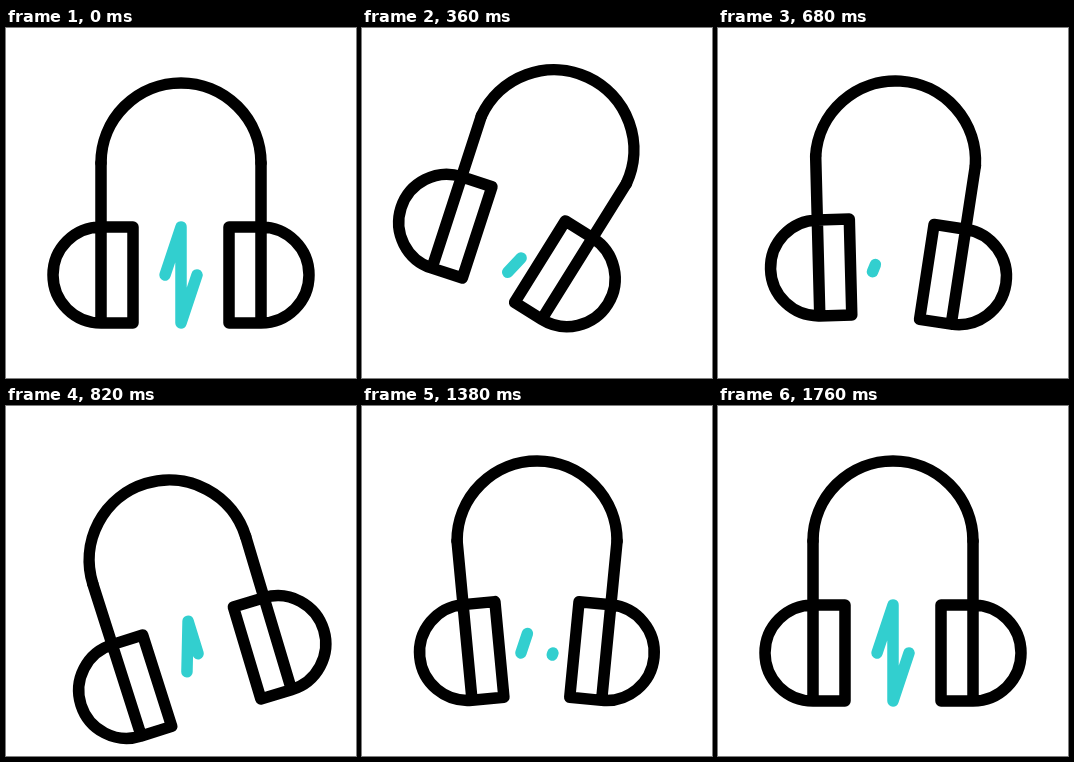
Write an HTML page with a canvas that moves like this. It is 350 by 350 pixels and loops after 2.4 s.

```html
<!DOCTYPE html>
<html lang="en">
<head>
<meta charset="utf-8">
<title>Headphones</title>
<style>
  html, body { margin: 0; width: 100%; height: 100%; overflow: hidden; background: #fff; }
  canvas { display: block; }
</style>
</head>
<body>
<canvas id="stage" width="350" height="350"></canvas>
<script>
const ctx = document.getElementById('stage').getContext('2d');
const LOOP = 2400, STEP = 20, RAD = Math.PI / 180;

// Keyframes: [time in ms, value], eased in and out between neighbours
const TILT = [[0, 0], [470, 29], [880, -20], [1200, 10], [1510, -6], [1760, 0]];
const LIFT = [[0, 0], [500, -21], [880, 20], [1250, 0]];
const SQUEEZE = [[0, 0], [520, 9], [870, 0], [1200, 9.5], [1600, 0]];

const bolt = new Path2D('M159 247 L175 199 V295 L191 247');
const boltLength = 96 + 2 * Math.hypot(16, 48);
const band = new Path2D('M95 135 A80 80 0 0 1 255 135');
const side = new Path2D('M95 135 V295 M127 199 H95 A48 48 0 0 0 95 295 H127 Z');

function ease(t, from, to) {
  const u = Math.min(1, Math.max(0, (t - from) / (to - from)));
  return u * u * (3 - 2 * u);
}

function track(keys, t) {
  let value = keys[0][1];
  for (let i = 1; i < keys.length; i++) {
    value += (keys[i][1] - keys[i - 1][1]) * ease(t, keys[i - 1][0], keys[i][0]);
  }
  return value;
}

function drawSide(squeeze, mirrored) {
  ctx.save();
  if (mirrored) {
    ctx.translate(350, 0);
    ctx.scale(-1, 1);
  }
  ctx.translate(95, 135);
  ctx.rotate(-squeeze * RAD);
  ctx.translate(-95, -135);
  ctx.stroke(side);
  ctx.restore();
}

// Strokes the part of the bolt between two fractions of its length
function drawBolt(from, to) {
  if (to <= from) return;
  ctx.setLineDash([(to - from) * boltLength + (to === 1 ? 1 : 0), 999]);
  ctx.lineDashOffset = -from * boltLength;
  ctx.stroke(bolt);
  ctx.setLineDash([]);
}

function draw(t) {
  ctx.fillStyle = '#fff';
  ctx.fillRect(0, 0, 350, 350);
  ctx.save();
  ctx.lineWidth = 11.5;
  ctx.lineCap = ctx.lineJoin = 'round';
  ctx.translate(175, 175 + track(LIFT, t));
  ctx.rotate(track(TILT, t) * RAD);
  ctx.translate(-175, -175);

  ctx.strokeStyle = '#32cfcf';
  drawBolt(ease(t, 0, 447), 1);
  drawBolt(ease(t, 920, 1410), ease(t, 630, 1050));
  drawBolt(0, ease(t, 1285, 1760));

  ctx.strokeStyle = '#000';
  const squeeze = track(SQUEEZE, t);
  ctx.stroke(band);
  drawSide(squeeze, false);
  drawSide(squeeze, true);
  ctx.restore();
}

const start = performance.now();
function frame() {
  const t = (performance.now() - start) % LOOP;
  draw(Math.floor(t / STEP) * STEP);
  requestAnimationFrame(frame);
}
frame();
</script>
</body>
</html>
```
